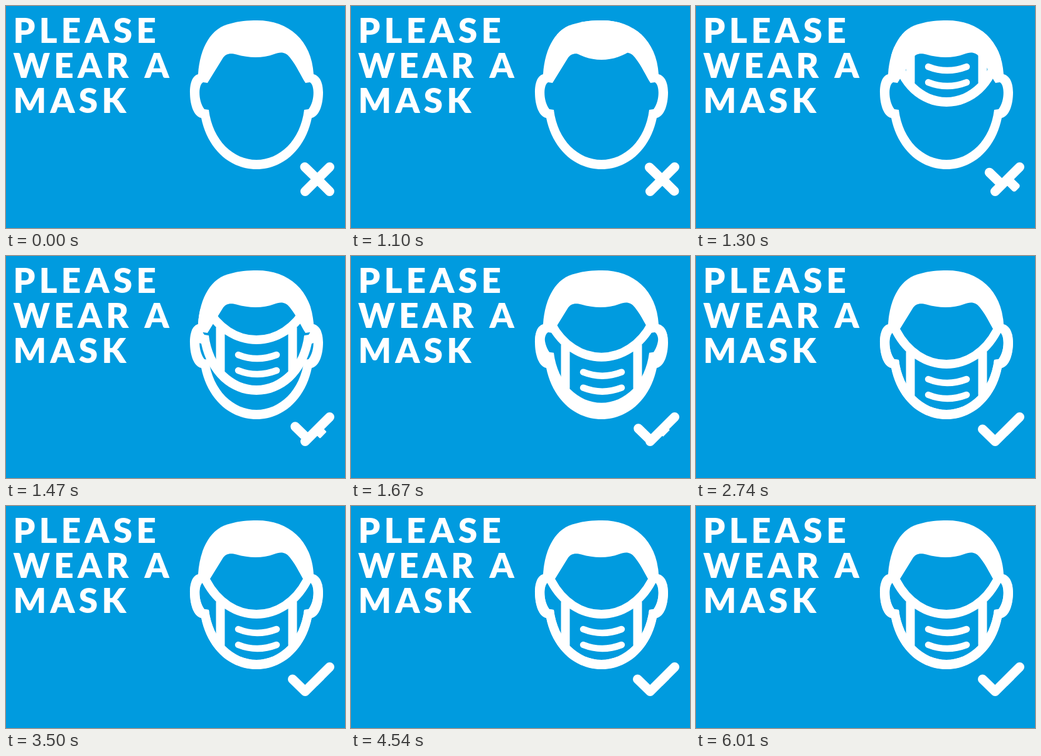
Recreate the animation shown at these times as an HTML page. Size 540 px wide and 355 px high, loop 6050 ms.

```html
<!DOCTYPE html>
<html lang="en">
<head>
<meta charset="utf-8">
<title>Please wear a mask</title>
<style>
  html, body { margin: 0; width: 100%; height: 100%; overflow: hidden; background: #009bdf; }
  svg { display: block; width: 100vw; height: 100vh; }
  text { font: 900 55px Lato, "Open Sans", sans-serif; letter-spacing: 6.2px; word-spacing: 2px; fill: #fff; }
  .line { fill: none; stroke: #fff; stroke-linecap: round; stroke-linejoin: round; }
</style>
</head>
<body>
<svg viewBox="0 0 540 355">
  <defs>
    <path id="ring" fill="#fff" fill-rule="evenodd"/>
    <clipPath id="headClip"><path id="head"/></clipPath>
    <clipPath id="lowerClip"><rect x="280" y="124" width="240" height="150"/></clipPath>
  </defs>
  <rect width="540" height="355" fill="#009bdf"/>
  <text x="11.500" y="59">PLEASE</text>
  <text x="11.500" y="115">WEAR A</text>
  <text x="11.500" y="171">MASK</text>

  <g clip-path="url(#headClip)">
    <g id="mask" class="line">
      <use href="#ring" clip-path="url(#lowerClip)" stroke="none"/>
      <path stroke-width="14" d="M319 120 C337 154 367 173 399 173 S461 154 479 120
        M341.500 154 V222 M456.500 154 V222"/>
      <path stroke-width="10.500" d="M370 197 Q400 209 431 197 M370 222 Q400 234 431 222"/>
    </g>
  </g>
  <use href="#ring"/>

  <path id="mark" class="line" stroke-width="15"/>
  <rect id="stub" y="-7.500" height="15" fill="#fff" transform="translate(496 277) rotate(45)"/>
</svg>
<script>
  const LOOP = 6050, START = 1000, DURATION = 1000, MASK_TRAVEL = 180;
  const HEAD = `M306 109 C309 66 327 34 358 28 C371 24 385 23 400 23
    C450 23 487 55 490 109 C501 112 505 125 505 138 C505 160 498 177 487 179
    C477 228 442 261 399 261 C356 261 321 228 311 179
    C300 177 293 160 293 138 C293 125 296 112 306 109 Z`;
  const FACE = `M321 123 L345 84 C350 76 357 75 367 77.5 C387 83.5 410 83.5 427 77
    C437 73 445 73 452 82 C465 99 468 109 477 123 L484 122
    C492 126 492 152 482 165 L475 166 C469 215 436 246 399 246
    C362 246 329 215 323 166 L316 165 C306 152 306 126 314 122 Z`;

  const byId = id => document.getElementById(id);
  const set = (id, attributes) => {
    for (const [name, value] of Object.entries(attributes)) byId(id).setAttribute(name, value);
  };

  const bezier = (a, b, s) => 3 * a * s * (1 - s) ** 2 + 3 * b * s * s * (1 - s) + s ** 3;

  // Gentle start, long settling: cubic-bezier(.4, 0, .12, 1).
  function ease(u) {
    if (u <= 0 || u >= 1) return u <= 0 ? 0 : 1;
    let low = 0, high = 1;
    for (let i = 0; i < 24; i++) {
      const mid = (low + high) / 2;
      if (bezier(0.4, 0.12, mid) < u) low = mid; else high = mid;
    }
    return bezier(0, 1, low);
  }

  // The cross becomes a tick: one arm slides down the stroke, the opposite arm retracts.
  function drawMark(p) {
    const slide = 19.5 * p;
    set('mark', {
      d: `M515.5 257.5 L476.5 296.5
        M${476 - slide} ${257.5 + slide} L${496 - slide} ${277 + slide}`
    });
    set('stub', { width: 7.5 + 27.5 * (1 - p), rx: 7.5 * (1 - p) });
  }

  function draw(time) {
    const p = ease((time - START) / DURATION);
    set('mask', {
      transform: `translate(0 ${-MASK_TRAVEL * (1 - p)})`,
      visibility: p > 0 ? 'visible' : 'hidden'
    });
    drawMark(p);
  }

  set('head', { d: HEAD });
  set('ring', { d: HEAD + FACE });

  const origin = performance.now();
  function tick() {
    draw((performance.now() - origin) % LOOP);
    requestAnimationFrame(tick);
  }
  tick();
</script>
</body>
</html>
```
